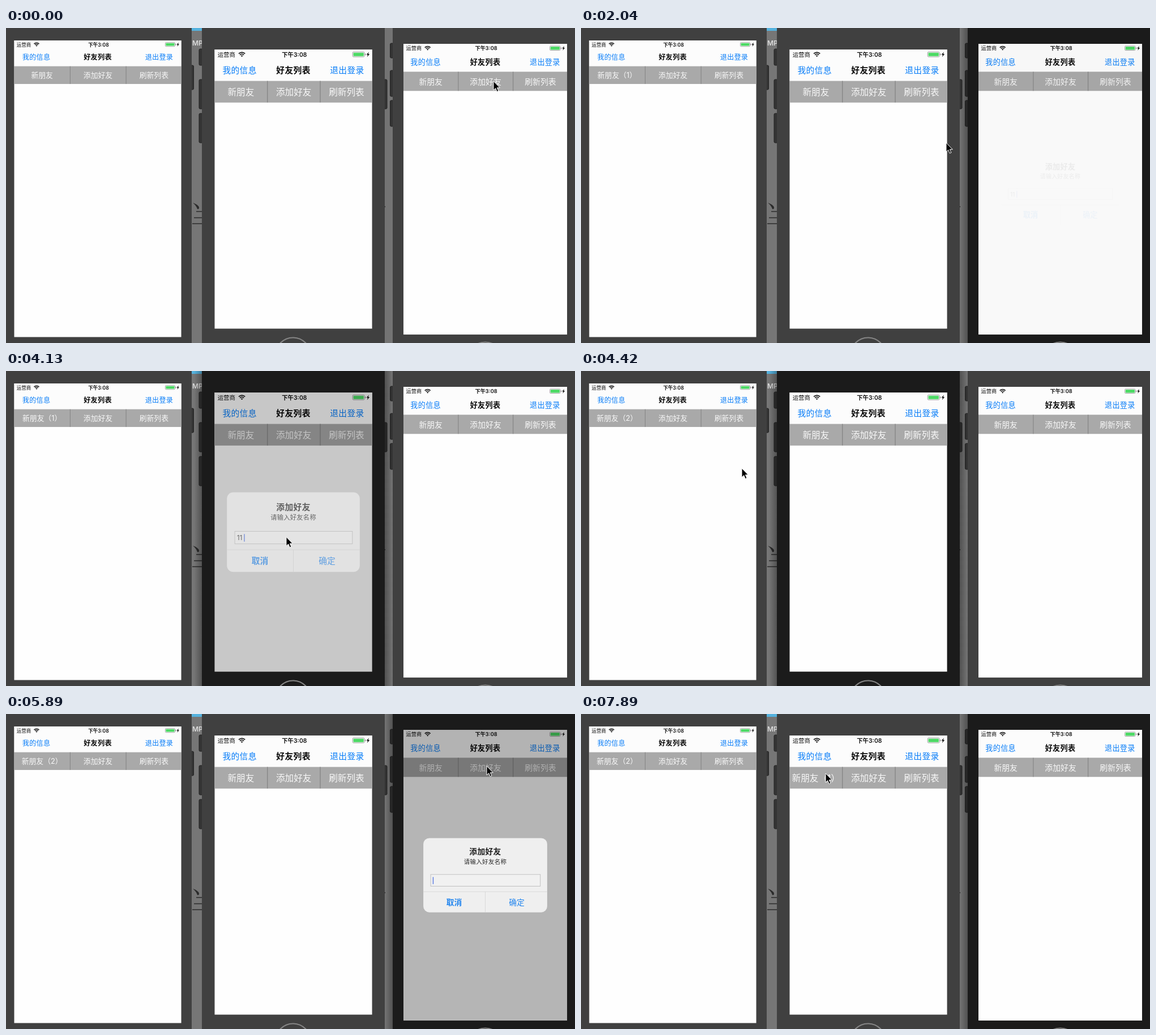
Write an HTML page that moves like this. It is 1005 px wide and 557 px high and loops after 8000 ms.

```html
<!DOCTYPE html>
<html lang="zh-CN">
<head>
<meta charset="utf-8">
<title>好友列表</title>
<style>
html, body { margin: 0; width: 100%; height: 100%; overflow: hidden; background: #404040; }
svg { display: block; width: 100%; height: 100%; font-family: Inter, "Noto Sans CJK SC", "Noto Sans CJK", sans-serif; }
</style>
</head>
<body>
<svg id="stage" viewBox="0 0 1005 557" preserveAspectRatio="none"></svg>
<script>
const LOOP = 8000;
const BLUE = '#087df8';

// Screen origin, scale and size in points; clock times in ms.
const phones = [
  { id: 'left', x: 14.5, y: 22, k: 0.7126, w: 414, h: 736, margin: 20, left: 0, right: 328,
    active: [], alerts: [], requests: [1890, 4265] },
  { id: 'mid', x: 368.5, y: 38, k: 0.869, w: 320, h: 568, margin: 16, left: 346, right: 669,
    home: [507, 578.5, 31], active: [[3070, 5460]],
    alerts: [{ open: 3230, close: 4050, keys: [3680, 3835], text: '11' }], requests: [7260] },
  { id: 'right', x: 702, y: 28, k: 0.7707, w: 375, h: 667, margin: 16, left: 683, right: 1005,
    home: [846.5, 588.5, 33], active: [[580, 3070], [5460, LOOP]],
    alerts: [{ open: 580, close: 1820, keys: [1015, 1160], text: '11' },
             { open: 5775, close: 6990, keys: [6205, 6355], text: '22' }], requests: [] }
];

// Pointer tip: time, x, y.
const pointer = [
  [0, 861, 94], [1160, 861, 94], [1450, 898, 328], [1750, 898, 328],
  [2044, 645, 203], [2480, 530, 112], [2920, 519, 112], [3220, 519, 112],
  [3380, 519, 143], [3690, 569, 336], [3980, 569, 336], [4421, 284, 172],
  [4570, 290, 174], [5010, 706, 190], [5160, 706, 190], [5613, 849, 92],
  [5918, 849, 92], [6070, 885, 280], [6210, 898, 328], [6960, 898, 328],
  [7580, 450, 114], [7890, 432, 105]
];

// Bursts of screen updates: first, last, count.
const bursts = [[580, 1600, 8], [1750, 2780, 8], [2920, 3840, 7], [3980, 5010, 8],
  [5160, 6070, 7], [6210, 6660, 4], [6960, 7890, 7]];

const rect = (x, y, w, h, fill, extra = '') =>
  `<rect x="${x}" y="${y}" width="${w}" height="${h}" fill="${fill}" ${extra}/>`;

// Text set by the vertical centre of its characters.
const label = (x, y, size, fill, text, anchor = 'middle', extra = '') =>
  `<text x="${x}" y="${y + size * 0.37}" font-size="${size}" fill="${fill}" text-anchor="${anchor}" ${extra}>${text}</text>`;

const BOLD = 'font-weight="600"';
const WIDE = 'letter-spacing="0.4"';

function desktop() {
  const key = (x, y, w, h) => rect(x, y, w, h, '#343434', 'rx="2" stroke="#232323"');
  return rect(328, 0, 18, 557, '#767676') + rect(669, 0, 14, 557, '#747474') +
    rect(328, 0, 18, 5, '#55b2de') +
    `<text x="329" y="31" font-size="12" font-weight="600" fill="#dcdcdc">MP</text>` +
    key(341, 37, 12, 29) + key(341, 91, 12, 52) + key(341, 151, 12, 52) + key(320, 66, 11.5, 43) +
    key(660, 91, 13, 52) + key(678.5, 27, 12, 26) + key(678.5, 75, 12, 46) + key(678.5, 128, 12, 46) +
    `<path d="M330 309q9 3 11 8q0 4-3 3q-2-6-8-11z" fill="#2b2b2b"/>` +
    `<path d="M336 324.5h10M332 335.5h14M329 346h17" stroke="#2b2b2b" stroke-width="1.5"/>` +
    rect(669, 315, 1, 2, '#333');
}

function statusBar(w) {
  return label(6, 10.4, 12, '#111', '运营商', 'start') +
    `<g fill="none" stroke="#111" stroke-width="2.1">
      <path d="M49 8.5a9.2 9.2 0 0 1 12.8 0M51.4 11a5.7 5.7 0 0 1 8 0"/></g>
    <path d="M53.2 12.7a3.2 3.2 0 0 1 4.4 0l-2.2 2.3z" fill="#111"/>` +
    label(w / 2 + 2, 10.4, 12, '#111', '下午3:08', 'middle', BOLD) +
    rect(w - 39.5, 5, 24, 10, '#fdfdfd', 'rx="2" stroke="#8f8f8f"') +
    rect(w - 38, 6.5, 21, 7, '#4cd964', 'rx="1"') +
    rect(w - 14.5, 8.2, 1.6, 3.6, '#8f8f8f', 'rx="0.8"') +
    `<path d="M${w - 6.5} 5l-5 5.7h2.7l-1.2 4.5 5-6h-2.8z" fill="#111"/>`;
}

function alertBox(p) {
  return `<g id="${p.id}Alert">` +
    rect(0, 0, 270, 162, '#f9f9f9', 'rx="13"') +
    label(135, 29.5, 17, '#0a0a0a', '添加好友', 'middle', BOLD + WIDE) +
    label(135, 51.3, 13, '#111', '请输入好友名称', 'middle', 'letter-spacing="0.3"') +
    rect(16, 79.5, 239, 25.5, '#fcfcfc', 'stroke="#bdbdbd" stroke-width="1.1"') +
    label(20.5, 92.5, 13, '#111', '', 'start', `id="${p.id}Input"`) +
    rect(20.5, 85, 1.8, 15.5, '#4b73ea', `id="${p.id}Caret"`) +
    `<path d="M0 117h270M135 117v45" stroke="#dadada"/>` +
    label(67, 139.8, 17, BLUE, '取消', 'middle', BOLD) +
    label(203.5, 139.8, 17, BLUE, '确定') + '</g>';
}

function phone(p) {
  const { id, w, h } = p, third = w / 3;
  const bar = ['新朋友', '添加好友', '刷新列表'].map((text, i) =>
    label(w / 6 + i * (third + 0.7), 86.2, 18, '#f8f8f8', text, 'middle', i ? '' : `id="${id}New"`)).join('');
  const home = p.home ? `<circle cx="${p.home[0]}" cy="${p.home[1]}" r="${p.home[2]}" fill="none" stroke="#858585" stroke-width="2"/>` : '';
  return rect(p.left, 0, p.right - p.left, 557, '#404040', `id="${id}Frame"`) + home +
    `<g id="${id}Shade">` +
    (p.left ? rect(p.left - 14, 0, 14, 557, 'url(#shadeIn)') : '') +
    (p.right < 1005 ? rect(p.right, 0, 14, 557, 'url(#shadeOut)') : '') + '</g>' +
    `<g transform="translate(${p.x} ${p.y}) scale(${p.k})">` +
    rect(0, 0, w, h, '#fefefe') + rect(0, 0, w, 64, '#fcfcfc') + statusBar(w) +
    label(p.margin, 42.1, 17, BLUE, '我的信息', 'start', WIDE) +
    label(w / 2, 42.1, 17, '#0a0a0a', '好友列表', 'middle', BOLD + WIDE) +
    label(w - p.margin, 42.1, 17, BLUE, '退出登录', 'end', WIDE) +
    rect(0, 64, w, 44, '#a9a9a9') +
    `<path d="M${third + 0.7} 64v44M${third * 2 + 1.3} 64v44" stroke="#7c7c7c" stroke-width="1.2"/>` + bar +
    rect(0, 0, w, h, '#000', `id="${id}Dim"`) + alertBox(p) + '</g>';
}

const shade = (id, from, to) => `<linearGradient id="${id}">
  <stop offset="0" stop-opacity="${from}"/><stop offset="1" stop-opacity="${to}"/></linearGradient>`;

document.getElementById('stage').innerHTML =
  `<defs>${shade('shadeIn', 0, 0.3)}${shade('shadeOut', 0.3, 0)}</defs>` +
  desktop() + phones.map(phone).join('') +
  `<path id="pointer" d="M0 0V16l3.7-3.4 2.5 5.9 2.7-1.1-2.5-5.7h4.9z" fill="#000" stroke="#fff" stroke-width="1" stroke-linejoin="round"/>`;

const $ = id => document.getElementById(id);

// The screen only refreshes in bursts; hold the clock in between.
function heldTime(t) {
  let held = 0;
  for (const [a, b, n] of bursts) {
    if (t < a) break;
    const step = (b - a) / (n - 1);
    held = a + step * Math.min(n - 1, Math.floor((t - a + 30) / step));
  }
  return held;
}

function pointerAt(t) {
  const i = pointer.findIndex(k => k[0] > t);
  if (i < 0) return pointer[pointer.length - 1].slice(1);
  const [t0, x0, y0] = pointer[i - 1], [t1, x1, y1] = pointer[i];
  const u = (t - t0) / (t1 - t0), e = u * u * (3 - 2 * u);
  return [x0 + (x1 - x0) * e, y0 + (y1 - y0) * e];
}

// Eased 0 to 1 over the alert transition.
const ease = ms => 1 - (1 - Math.min(1, Math.max(0, ms / 290))) ** 2;

function drawAlert(p, t) {
  const a = p.alerts.find(s => t >= s.open && t < s.close + 290);
  const box = $(p.id + 'Alert'), dim = $(p.id + 'Dim');
  const shown = a ? ease(t - a.open) : 0;
  const left = a ? 1 - ease(t - a.close) : 0;
  dim.setAttribute('opacity', 0.39 * shown * left);
  box.setAttribute('opacity', Math.min(1, shown * 1.15) * left);
  if (!a) return;
  const s = 1.2 - 0.2 * shown;
  box.setAttribute('transform', `translate(${p.w / 2} ${p.h / 2}) scale(${s}) translate(-135 -81)`);
  const typed = a.keys.filter(k => t >= k).length;
  $(p.id + 'Input').textContent = a.text.slice(0, typed);
  $(p.id + 'Caret').setAttribute('x', 20.5 + typed * 7);
}

function draw(now) {
  const t = heldTime(now);
  for (const p of phones) {
    const active = p.active.some(([a, b]) => t >= a && t < b);
    $(p.id + 'Frame').setAttribute('fill', active ? '#1b1b1b' : '#404040');
    $(p.id + 'Shade').setAttribute('opacity', active ? 1 : 0);
    const count = p.requests.filter(r => t >= r).length;
    $(p.id + 'New').textContent = '新朋友' + (count ? `（${count}）` : '');
    drawAlert(p, t);
  }
  $('pointer').setAttribute('transform', `translate(${pointerAt(t).join(' ')})`);
}

const start = performance.now();
function tick() {
  draw((performance.now() - start) % LOOP);
  requestAnimationFrame(tick);
}
tick();
</script>
</body>
</html>
```
